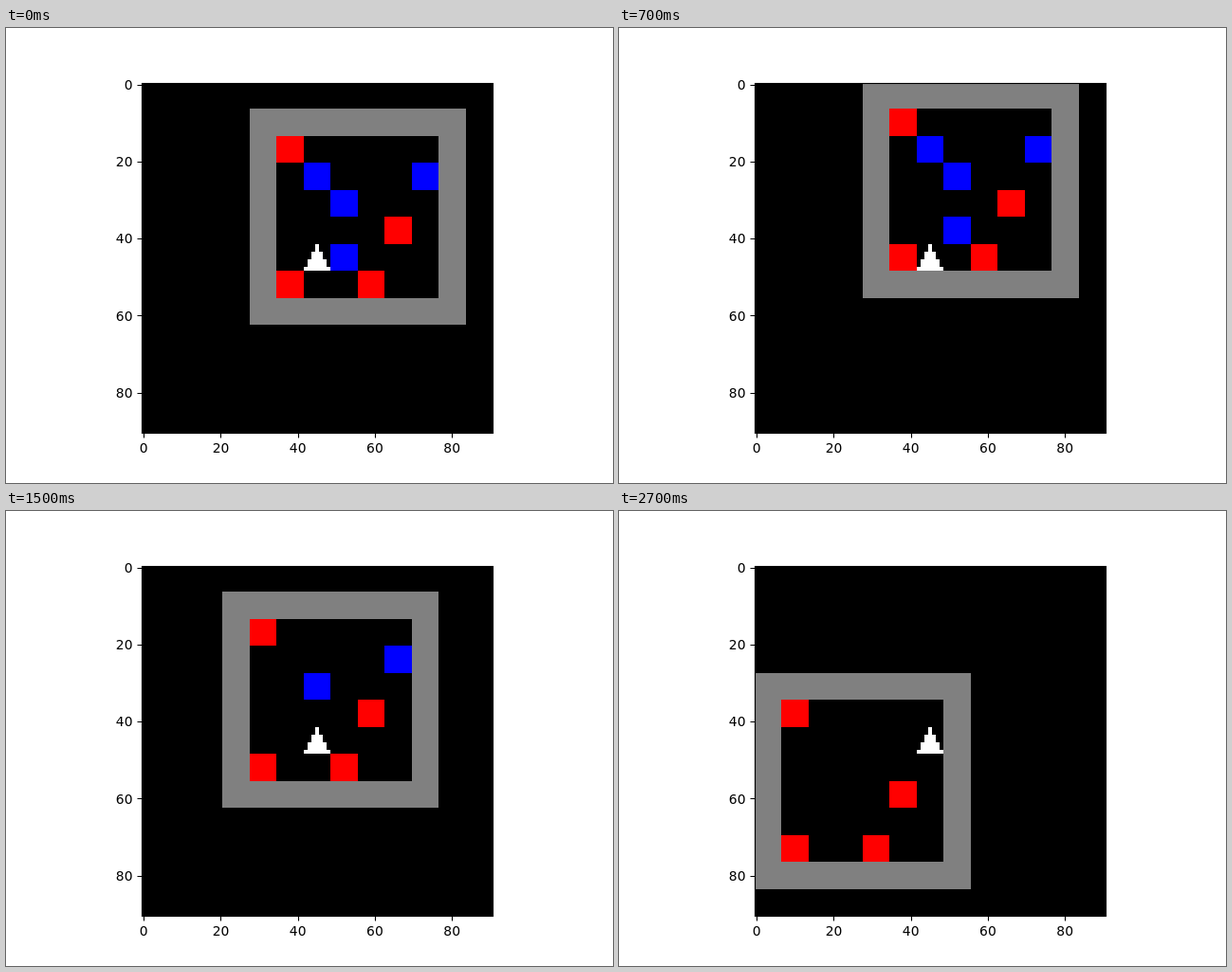
Animation of 640 by 480 pixels, one loop 2.8 s. Source, as an HTML page:

```html
<!DOCTYPE html>
<html lang="en">
<head>
<meta charset="utf-8">
<title>Grid agent</title>
<style>
  html, body { margin: 0; width: 100%; height: 100%; overflow: hidden; background: #fff; }
  svg { display: block; width: 640px; height: 480px; }
  text { font: 13.89px "DejaVu Sans", sans-serif; fill: #000; }
</style>
</head>
<body>
<svg viewBox="0 0 640 480">
  <defs><clipPath id="axes"><rect x="143" y="58" width="371" height="370"/></clipPath></defs>
  <rect x="143" y="58" width="371" height="370"/>
  <g id="world" clip-path="url(#axes)" shape-rendering="crispEdges"></g>
  <rect x="143.5" y="58.5" width="370" height="369" fill="none" stroke="#000" stroke-width="1.11"/>
  <g id="ticks" stroke-width="1.11"></g>
</svg>
<script>
const STEP = 100, LOOP = 2800, CELL = 7, CENTER = 6, ROOM = 8;
const MOVES = "UDDUUDDUUUUDDDRULULRRRUDRUR";
const DIRS = { U: [0, -1], D: [0, 1], L: [-1, 0], R: [1, 0] };
const RED = [[1, 1], [5, 4], [1, 6], [4, 6]];
const BLUE = [[2, 2], [6, 2], [3, 3], [3, 5]];

const path = [[2, 5]];
for (const m of MOVES) {
  const [x, y] = path[path.length - 1];
  path.push([x + DIRS[m][0], y + DIRS[m][1]]);
}

// Image units (0..91) to whole stage pixels
const px = u => Math.round(143 + u * 370 / 91);
const py = u => Math.round(57 + u * 370 / 91);

function block(x, y, w, h, fill) {
  const l = px(x), t = py(y);
  return `<rect x="${l}" y="${t}" width="${px(x + w) - l}" height="${py(y + h) - t}" fill="${fill}"/>`;
}

function agent() {
  const o = CENTER * CELL;
  let s = "";
  for (let i = 0; i < 4; i++) {
    s += block(o + 3 - i, o + 2 * i, 2 * i + 1, i < 3 ? 2 : 1, "#fff");
  }
  return s;
}

function scene(step) {
  const [ax, ay] = path[step];
  const cells = (x, y, n, fill) =>
    block((x - ax + CENTER) * CELL, (y - ay + CENTER) * CELL, n * CELL, n * CELL, fill);
  const visited = ([x, y]) => path.slice(0, step + 1).some(p => p[0] === x && p[1] === y);
  let s = cells(0, 0, ROOM, "#808080") + cells(1, 1, ROOM - 2, "#000");
  for (const [x, y] of RED) s += cells(x, y, 1, "#f00");
  for (const b of BLUE) if (!visited(b)) s += cells(b[0], b[1], 1, "#00f");
  return s + agent();
}

function ticks() {
  let s = "";
  for (let v = 0; v <= 80; v += 20) {
    const d = (v + 0.5) * 369.6 / 91, x = 143.2 + d, y = 57.6 + d;
    const tx = Math.round(x) + 0.5, ty = Math.round(y) + 0.5;
    s += `<path d="M${tx} 427.5v5M143.5 ${ty}h-5" stroke="#000"/>`;
    s += `<text x="${x}" y="448" text-anchor="middle">${v}</text>`;
    s += `<text x="133.5" y="${Math.round(y + 5.28)}" text-anchor="end">${v}</text>`;
  }
  return s;
}

const world = document.getElementById("world");
document.getElementById("ticks").innerHTML = ticks();

const start = performance.now();
let shown = -1;
function draw() {
  const step = Math.floor((performance.now() - start) % LOOP / STEP);
  if (step !== shown) {
    world.innerHTML = scene(step);
    shown = step;
  }
  requestAnimationFrame(draw);
}
draw();
</script>
</body>
</html>
```
